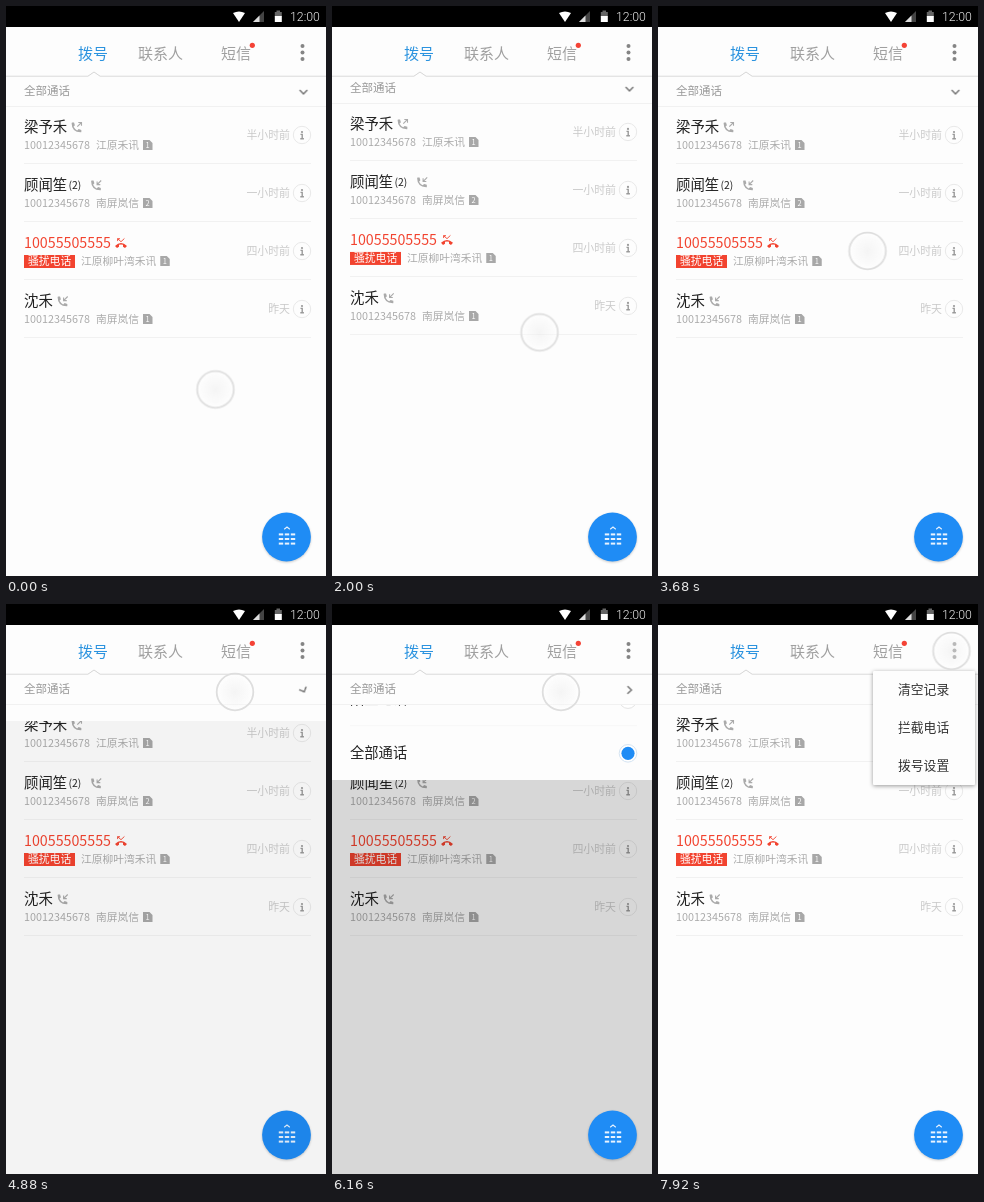
Write an HTML page that moves like this. It is 320 by 570 pixels and loops after 8 s.

```html
<!DOCTYPE html>
<html lang="zh-CN">
<head>
<meta charset="utf-8">
<title>拨号</title>
<style>
html, body { margin: 0; height: 100%; overflow: hidden; background: #fdfdfd; }
svg { display: block; width: 100vw; height: 100vh; }
text { font-family: "Noto Sans CJK SC", "Noto Sans CJK", "Noto Sans", sans-serif; }
.light { font-weight: 300; }
.clock { font-family: Roboto, sans-serif; font-weight: 300; }

.scroll, .panel, .shade, .fab-shade, .arrow, .menu, .cursor {
  animation: 8s linear infinite;
}
.scroll { animation-name: scroll; }
.panel { animation-name: panel; }
.shade { animation-name: shade; }
.fab-shade { animation-name: fab-shade; }
.arrow { animation-name: arrow; }
.menu { animation-name: menu; transform-origin: 317px 67px; filter: drop-shadow(0 1px 2px #0006); }
.cursor { animation-name: cursor; }
.bar { filter: drop-shadow(0 .5px .6px #0004); }
.fab { filter: drop-shadow(0 1px 1px #0003); }

/* Overscroll drag, then the list springs back. */
@keyframes scroll {
  0%, 23% { transform: translateY(0); animation-timing-function: ease-in; }
  25% { transform: translateY(-3px); }
  34% { transform: translateY(-41px); animation-timing-function: cubic-bezier(.5, .62, .7, 1); }
  39% { transform: translateY(-57px); animation-timing-function: ease-in-out; }
  44%, 100% { transform: translateY(0); }
}
@keyframes panel {
  0%, 60% { transform: translateY(-162px); animation-timing-function: ease-in-out; }
  64%, 75% { transform: translateY(0); animation-timing-function: ease-in-out; }
  79%, 100% { transform: translateY(-162px); }
}
@keyframes shade {
  0%, 60% { opacity: 0; animation-timing-function: ease-in-out; }
  64%, 75% { opacity: .3; animation-timing-function: ease-in-out; }
  79%, 100% { opacity: 0; }
}
@keyframes fab-shade {
  0%, 60% { opacity: 0; animation-timing-function: ease-in-out; }
  64%, 75% { opacity: .3; }
  75.01%, 100% { opacity: 0; }
}
@keyframes arrow {
  0%, 60% { transform: rotate(0deg); animation-timing-function: ease-in-out; }
  64%, 75% { transform: rotate(-180deg); animation-timing-function: ease-in-out; }
  79%, 100% { transform: rotate(0deg); }
}
@keyframes menu {
  0%, 93.5% { transform: scale(.3); opacity: 0; animation-timing-function: ease-out; }
  97%, 100% { transform: scale(1); opacity: 1; }
}
@keyframes cursor {
  0%, 5% { transform: translate(209.5px, 383.5px); animation-timing-function: cubic-bezier(.4, 0, .8, .6); }
  25% { transform: translate(207.5px, 326.5px); }
  34% { transform: translate(209px, 270px); animation-timing-function: cubic-bezier(.5, .62, .7, 1); }
  39%, 46% { transform: translate(209.5px, 245px); animation-timing-function: cubic-bezier(.3, 0, .1, 1); }
  59%, 82% { transform: translate(229px, 88px); animation-timing-function: cubic-bezier(.4, 0, .2, 1); }
  92.5%, 100% { transform: translate(293.5px, 47px); }
}
</style>
</head>
<body>
<svg id="stage" viewBox="0 0 320 570" preserveAspectRatio="none"></svg>
<script>
const BLUE = '#1f8cf5', RED = '#f2432f', INK = '#222', SOFT = '#ababab', PALE = '#cacaca';

// Text placed by the vertical centre of its glyphs.
const label = (x, cy, size, fill, str, attrs = '') =>
  `<text x="${x}" y="${cy + size * .37}" font-size="${size}" fill="${fill}" ${attrs}>${str}</text>`;
const rect = (x, y, w, h, fill, attrs = '') =>
  `<rect x="${x}" y="${y}" width="${w}" height="${h}" fill="${fill}" ${attrs}/>`;
const dot = (x, y, r, fill, attrs = '') =>
  `<circle cx="${x}" cy="${y}" r="${r}" fill="${fill}" ${attrs}/>`;
const line = (d, color, width = 1) =>
  `<path d="${d}" fill="none" stroke="${color}" stroke-width="${width}"/>`;
const LIGHT = 'class="light"';

const HANDSET = 'M3 4q0-1 1-1h3.5l1.5 5-2.4 2.8q2.2 4.3 6.6 6.6l2.8-2.4 5 1.5V20q0 1-1 1Q3 20 3 4z';
const HUNG_UP = 'M0 8.4Q6 2.6 12 8.4L10 10.6L8 9.2V7.3Q6 6.6 4 7.3V9.2L2 10.6z';
const ARROWS = {
  out: 'M6.3 5.2L10.5 1M7.3 1h3.2v3.2',
  in: 'M10.7 1L6.6 5.1M6.6 1.9v3.2h3.2'
};

function callIcon(x, cy, kind) {
  const at = `<g transform="translate(${x} ${cy - 5.5})">`;
  if (kind === 'missed') {
    return at + `<path d="${HUNG_UP}" fill="${RED}"/>`
      + line('M2.6 3.6V1.2H5M2.6 1.2L6 4.2L9.4 1', RED, .9) + '</g>';
  }
  return at + `<path d="${HANDSET}" fill="#aaa" transform="translate(-1 -.5) scale(.54)"/>`
    + line(ARROWS[kind], '#aaa', 1.1) + '</g>';
}

const simIcon = (x, cy, slot) =>
  `<path d="M${x} ${cy - 5}h6.5l3 3v7h-9.5z" fill="#a8a8a8"/>`
  + label(x + 4.7, cy + .3, 7.5, '#fff', slot, 'text-anchor="middle"');

const infoIcon = cy =>
  dot(296, cy, 8.7, '#fdfdfd', 'stroke="#e8e8e8"') + dot(296, cy - 3, 1.1, '#999')
  + line(`M294.5 ${cy - .6}h1.7v4.3M294.3 ${cy + 3.8}h3.6`, '#999', 1.4);

const calls = [
  { name: '梁予禾', kind: 'out', iconX: 65, carrier: '江原禾讯', sim: 1, when: '半小时前' },
  { name: '顾闻笙', count: '(2)', kind: 'in', iconX: 84.5, carrier: '南屏岚信', sim: 2, when: '一小时前' },
  { name: '10055505555', kind: 'missed', iconX: 109, carrier: '江原柳叶湾禾讯', sim: 1, when: '四小时前' },
  { name: '沈禾', kind: 'in', iconX: 51, carrier: '南屏岚信', sim: 1, when: '昨天' }
];

function callRow(call, i) {
  const y = 121 + 58 * i, sub = y + 18, missed = call.kind === 'missed';
  const carrierX = missed ? 75 : 90;
  return label(18, y, missed ? 14.25 : 14.4, missed ? RED : INK, call.name, missed ? LIGHT : '')
    + (call.count ? label(62.5, y, 10.4, INK, call.count) : '')
    + callIcon(call.iconX, y, call.kind)
    + (missed
      ? rect(18, sub - 6, 51, 13, RED) + label(22, sub, 10.8, '#fff', '骚扰电话', LIGHT)
      : label(18, sub, 10.8, SOFT, '10012345678', LIGHT))
    + label(carrierX, sub, 10.75, SOFT, call.carrier, LIGHT)
    + simIcon(carrierX + call.carrier.length * 10.75 + 4, sub, call.sim)
    + label(284, y + 8, 10.9, PALE, call.when, LIGHT + ' text-anchor="end"')
    + infoIcon(y + 8)
    + line(`M18 ${y + 36.5}H305`, '#f1f1f1');
}

function option(name, i) {
  const y = 123 + 53.7 * i, chosen = i === 2;
  return label(18, y, 14.3, INK, name)
    + dot(296, y + .8, 8.8, '#fff', `stroke="${chosen ? '#d5e4f2' : '#e4e4e4'}"`)
    + (chosen ? dot(296, y + .8, 6.6, BLUE) : line(`M18 ${y + 27}H305`, '#f7f7f7'));
}

const list = `<g class="scroll">
  ${calls.map(callRow).join('')}
  ${rect(0, 70, 320, 500, '#000', 'class="shade"')}
  <g class="panel">${rect(0, 70, 320, 188, '#fdfdfd')}
    ${['未接电话', '陌生电话', '全部通话'].map(option).join('')}</g>
  ${rect(0, 60, 320, 40, '#fdfdfd')}${line('M0 100.5H320', '#f1f1f1')}
  ${label(18, 85, 11.5, '#999', '全部通话', LIGHT)}
  <g transform="translate(297.5 86)"><g class="arrow">${line('M-3.8 -2L0 1.9L3.8 -2', '#777', 1.5)}</g></g>
</g>`;

const header = `<path class="bar" d="M0 20H320V70H94L88 66L82 70H0z" fill="#fdfdfd"/>`
  + line('M0 70.2H82L88 66L94 70.2H320', '#d6d6d6', .9)
  + label(72, 47, 15, '#2b93df', '拨号')
  + label(132, 47, 15, '#a0a0a0', '联系人', LIGHT)
  + label(215, 47, 15, '#a0a0a0', '短信', LIGHT)
  + dot(246.3, 39.3, 2.6, '#f44336')
  + [40, 46.5, 53].map(y => dot(296.5, y, 2, '#858585')).join('');

const statusBar = rect(0, 0, 320, 21, '#000')
  + '<path d="M227 7Q233 4 239 7L233 16z" fill="#fff"/>'
  + '<path d="M258 5V16H247z" fill="#444"/><path d="M253.5 9.5V16H247z" fill="#ddd"/>'
  + rect(270.5, 4.5, 3.5, 2, '#666') + rect(268.8, 6, 7, 4.5, '#666') + rect(268.8, 10, 7, 6, '#fff')
  + '<text class="clock" x="284" y="15" font-size="12.3" fill="#eee">12:00</text>';

const keys = [527.4, 532, 536.6].map(y =>
  [272.8, 278.8, 284.8].map(x => rect(x, y, 4.4, 2, '#e8f3ff')).join('')).join('');
const fab = dot(280.5, 531, 24.4, BLUE, 'class="fab"') + keys
  + line('M278.2 523.2L281 521L283.8 523.2', '#e8f3ff', 1.1)
  + dot(280.5, 531, 24.4, '#000', 'class="fab-shade"');

const menu = `<g class="menu">${rect(215, 67, 102, 114, '#fdfdfd', 'rx="1"')}
  ${['清空记录', '拦截电话', '拨号设置'].map((item, i) => label(240, 85 + 38 * i, 12.8, '#333', item)).join('')}</g>`;

const cursor = `<g class="cursor">${dot(0, 0, 18.3, 'url(#touch)', 'stroke="#dedede" stroke-width="1.8"')}</g>`;

document.getElementById('stage').innerHTML = `<defs><radialGradient id="touch">
    <stop offset="0" stop-color="#ececec" stop-opacity=".5"/>
    <stop offset=".7" stop-color="#f8f8f8" stop-opacity=".45"/>
    <stop offset="1" stop-color="#fff" stop-opacity=".4"/>
  </radialGradient></defs>
  ${rect(0, 0, 320, 570, '#fdfdfd')}${list}${header}${statusBar}${fab}${menu}${cursor}`;
</script>
</body>
</html>
```
